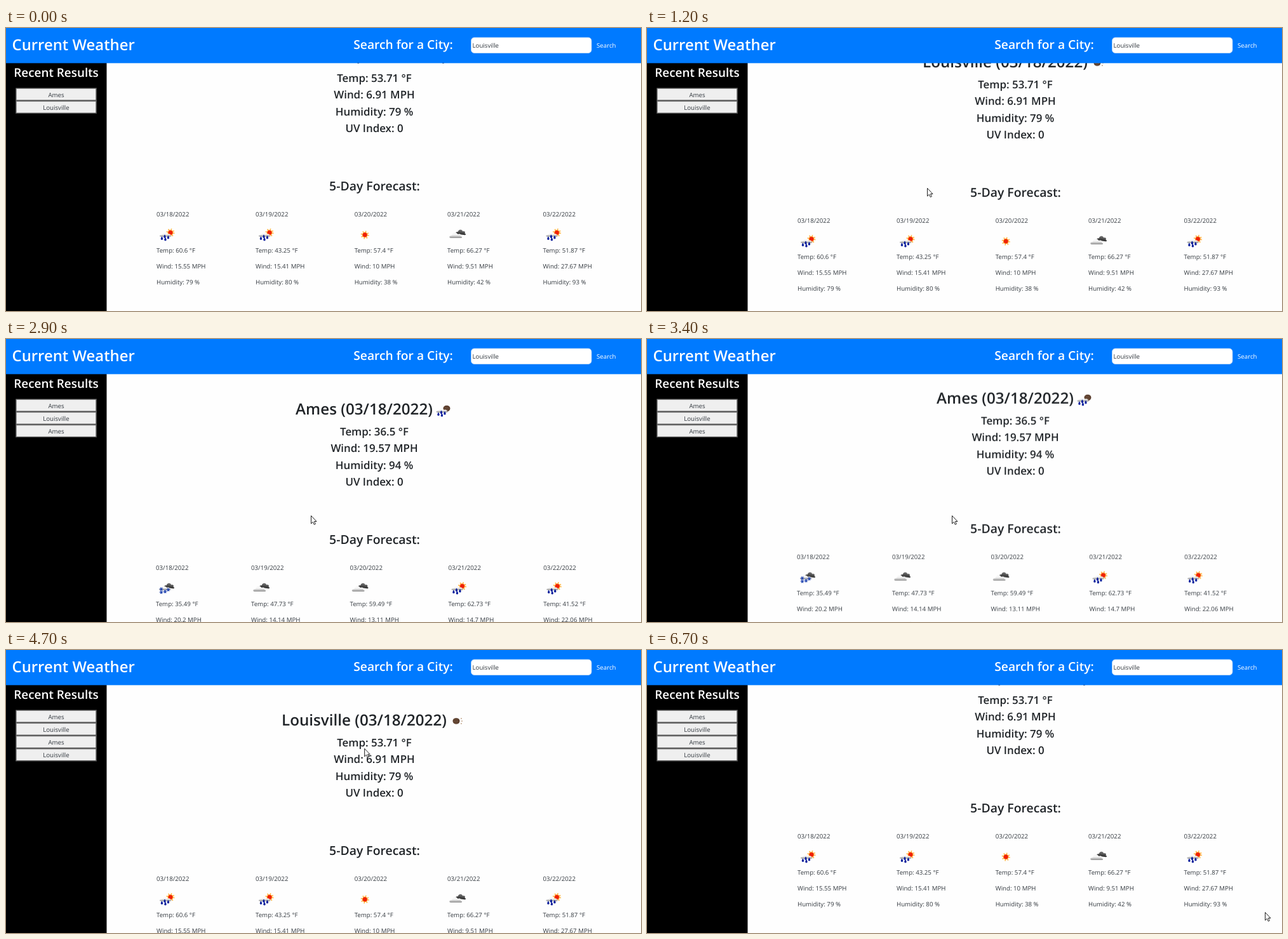
An HTML page that plays this animation: 1000x446 px, repeating every 6.8 s.

```html
<!DOCTYPE html>
<html lang="en">
<head>
<meta charset="utf-8">
<title>Current Weather</title>
<style>
  html, body { margin: 0; width: 100%; height: 100%; overflow: hidden; background: #fefefe; }
  svg { display: block; width: 1000px; height: 446px; }
  text { font-family: "Open Sans", "Noto Sans", sans-serif; text-rendering: geometricPrecision; }
  .small { font-size: 9.7px; fill: #343a40; }
  .bold { font-weight: 600; fill: #212529; }
  .white { fill: #fff; }
  .mid { text-anchor: middle; }

  /* One loop is 6.8 s, so 1% is 68 ms. */
  #page, #cursor, #arrow, #hand, #louisville, #ames, #row2, #row3 {
    animation: 6.8s linear infinite;
  }
  #page { animation-name: scroll; }
  #cursor { animation-name: move; }
  #arrow { animation-name: arrow; animation-timing-function: step-end; }
  #hand { animation-name: hand; animation-timing-function: step-end; }
  #louisville { animation-name: louisville; animation-timing-function: step-end; }
  #ames { animation-name: ames; animation-timing-function: step-end; }
  #row2 { animation-name: row2; animation-timing-function: step-end; }
  #row3 { animation-name: row3; animation-timing-function: step-end; }

  @keyframes scroll {
    0%, 16.9% { transform: translateY(-67px); }
    22%, 48.5% { transform: translateY(0); }
    54.4%, 64.54% { transform: translateY(-67px); }
    64.55%, 76.47% { transform: translateY(0); }
    79.41% { transform: translateY(-52px); }
    80.88%, 100% { transform: translateY(-67px); }
  }
  @keyframes move {
    0%, 6.6% { transform: translate(1010px, 340px); }
    13.2%, 22% { transform: translate(441px, 252px); }
    26.8%, 37.5% { transform: translate(106px, 106px); }
    42.3%, 54.4% { transform: translate(480px, 278px); }
    58%, 65.4% { transform: translate(70px, 127px); }
    72.5%, 84% { transform: translate(1010px, 180px); }
    94% { transform: translate(975px, 398px); }
    98.5%, 100% { transform: translate(973px, 413px); }
  }
  @keyframes arrow {
    0% { opacity: 1; } 26% { opacity: 0; } 38% { opacity: 1; }
    57.3% { opacity: 0; } 66% { opacity: 1; } 100% { opacity: 1; }
  }
  @keyframes hand {
    0% { opacity: 0; } 26% { opacity: 1; } 38% { opacity: 0; }
    57.3% { opacity: 1; } 66% { opacity: 0; } 100% { opacity: 0; }
  }
  @keyframes louisville { 0% { opacity: 1; } 36.6% { opacity: 0; } 64.55% { opacity: 1; } 100% { opacity: 1; } }
  @keyframes ames { 0% { opacity: 0; } 36.6% { opacity: 1; } 64.55% { opacity: 0; } 100% { opacity: 0; } }
  @keyframes row2 { 0% { opacity: 0; } 36.6% { opacity: 1; } 100% { opacity: 1; } }
  @keyframes row3 { 0% { opacity: 0; } 64.55% { opacity: 1; } 100% { opacity: 1; } }
</style>
</head>
<body>
<svg viewBox="0 0 1000 446" xmlns="http://www.w3.org/2000/svg">
  <defs>
    <linearGradient id="pale" x2="0" y2="1">
      <stop offset=".4" stop-color="#f7f7f7"/><stop offset="1" stop-color="#8c8c8c"/>
    </linearGradient>
    <linearGradient id="dark" x2="0" y2="1">
      <stop stop-color="#777"/><stop offset="1" stop-color="#2b2b2b"/>
    </linearGradient>
    <path id="puff" d="M-10 4.500C-14 4-13 0-8 0C-8-5 0-7 2-2C6-4 9-1 7 1C11 2 10 4.500 7 4.500Z"/>
    <path id="drop" d="M0-3C2 0 2.300 2.400 0 2.400S-2.300 0 0-3Z"/>
    <path id="flake" d="M-3 0H3M-1.500-2.600L1.500 2.600M1.500-2.600L-1.500 2.600" stroke="#1b3fae" stroke-width="1.100"/>

    <g id="sun">
      <circle r="5.300" fill="none" stroke="#ffb845" stroke-width="2.400" stroke-dasharray="1.600 2.563"/>
      <circle r="4.300" fill="#ff8a1c"/><circle r="3.200" fill="#ee1f0a"/>
    </g>
    <g id="moon">
      <ellipse rx="5.500" ry="4.800" fill="#573a29"/>
      <path d="M-3.500-2H3M-4 .5H4M-3 3H2" stroke="#a58468" stroke-width=".8" stroke-dasharray="1 1"/>
    </g>
    <g id="night">
      <use href="#moon" x="-1"/>
      <path d="M6-4H8M7 0H9M6 4H8" stroke="#a57a55"/>
    </g>
    <g id="cloud">
      <use href="#puff" transform="translate(6 -4) rotate(8) scale(.72 .8)" fill="url(#dark)"/>
      <use href="#puff" transform="translate(-2 1) scale(.9)" fill="url(#pale)"/>
    </g>
    <g id="rainfall">
      <use href="#puff" transform="translate(-1) scale(.85 .6)" fill="url(#pale)"/>
      <g fill="#0b1f9c">
        <use href="#drop" x="-8" y="5.500"/><use href="#drop" x="-3.500" y="2.500"/>
        <use href="#drop" x="-2.500" y="7"/><use href="#drop" x="2" y="4"/>
      </g>
    </g>
    <g id="rain"><use href="#sun" x="5.500" y="-3.500"/><use href="#rainfall"/></g>
    <g id="nightrain"><use href="#moon" x="5" y="-3.500"/><use href="#rainfall"/></g>
    <g id="snow">
      <use href="#puff" transform="translate(6 -4) rotate(8) scale(.72 .8)" fill="url(#dark)"/>
      <use href="#puff" transform="translate(-1) scale(.85 .6)" fill="url(#pale)"/>
      <use href="#flake" x="-8" y="1"/><use href="#flake" x="-8" y="6"/>
      <use href="#flake" x="-2" y="5"/><use href="#flake" x="3" y="2"/>
    </g>
  </defs>

  <rect width="1000" height="446" fill="#fefefe"/>
  <g id="page">
    <text class="bold mid" x="580.500" y="322.500" font-size="19.400">5-Day Forecast:</text>
  </g>

  <rect y="55" width="158.500" height="391" fill="#000"/>
  <text class="bold white mid" x="79" y="77" font-size="18.900">Recent Results</text>
  <g id="history"></g>

  <rect width="1000" height="55.400" fill="#007aff"/>
  <text class="bold white" x="9.500" y="35" font-size="23.900">Current Weather</text>
  <text class="bold white" x="547.200" y="33" font-size="19.300">Search for a City:</text>
  <rect x="732.500" y="15" width="189.500" height="24.500" rx="5" fill="#fff" stroke="#b5d2f5" stroke-width=".8"/>
  <text class="small" x="734.500" y="31">Louisville</text>
  <text class="small" x="930" y="31" style="fill:#fff">Search</text>

  <g id="cursor" stroke="#222" stroke-linejoin="round">
    <path id="arrow" fill="#fff" d="M.5.5V13L3.400 10.300L5.300 14.500L7.300 13.600L5.500 9.500H9Z"/>
    <path id="hand" fill="#fff" d="M-1.400 1C-1.400-.6 1-.6 1 1V6L6 7Q7.500 7.300 7.300 9L6.500 13V16H-1V14L-5 9.500C-6 8-4.200 7-3 8L-1.400 9.500Z"/>
  </g>
</svg>
<script>
  const NS = 'http://www.w3.org/2000/svg';

  function add(parent, tag, attrs, content = '') {
    const el = document.createElementNS(NS, tag);
    for (const [name, value] of Object.entries(attrs)) el.setAttribute(name, value);
    el.textContent = content;
    return parent.appendChild(el);
  }

  const icon = (parent, name, x, y) => add(parent, 'use', { href: '#' + name, x, y });

  // Each day: left edge, icon, temperature, wind, humidity.
  const cities = [
    {
      name: 'Louisville', now: [53.71, 6.91, 79], icon: ['night', 710, 112],
      days: [
        [237, 'rain', 60.6, 15.55, 79],
        [393, 'rain', 43.25, 15.41, 80],
        [548.7, 'sun', 57.4, 10, 38],
        [695, 'cloud', 66.27, 9.51, 42],
        [845.5, 'rain', 51.87, 27.67, 93]
      ]
    },
    {
      name: 'Ames', now: [36.5, 19.57, 94], icon: ['nightrain', 689, 113],
      days: [
        [236, 'snow', 35.49, 20.2, 98],
        [386, 'cloud', 47.73, 14.14, 47],
        [541.5, 'cloud', 59.49, 13.11, 45],
        [696.5, 'rain', 62.73, 14.7, 53],
        [846.3, 'rain', 41.52, 22.06, 88]
      ]
    }
  ];

  const readings = (temp, wind, humidity) =>
    [`Temp: ${temp} °F`, `Wind: ${wind} MPH`, `Humidity: ${humidity} %`];

  const page = document.getElementById('page');
  for (const city of cities) {
    const group = add(page, 'g', { id: city.name.toLowerCase() });
    add(group, 'text', { class: 'bold mid', x: 564, y: 119, 'font-size': 24.2 }, `${city.name} (03/18/2022)`);
    icon(group, ...city.icon);
    [...readings(...city.now), 'UV Index: 0'].forEach((line, i) =>
      add(group, 'text', { class: 'bold mid', x: 580, y: 152 + i * 26.25, 'font-size': 16.9 }, line));

    city.days.forEach(([x, name, ...values], day) => {
      add(group, 'text', { class: 'small', x, y: 363.6 }, `03/${18 + day}/2022`);
      icon(group, name, x + 16.5, 393);
      readings(...values).forEach((line, i) =>
        add(group, 'text', { class: 'small', x, y: 420.6 + i * 25.3 }, line));
    });
  }

  // Raised buttons: lighter top and left edges, darker bottom and right ones.
  const history = document.getElementById('history');
  ['Ames', 'Louisville', 'Ames', 'Louisville'].forEach((name, i) => {
    const row = add(history, 'g', { id: 'row' + i });
    const y = 94.5 + i * 20.2;
    add(row, 'rect', { x: 15.3, y, width: 127.4, height: 20.2, fill: '#767676' });
    add(row, 'path', { d: `M142.7 ${y}V${y + 20.2}H15.3L17 ${y + 18.8}H141.3V${y + 1.4}Z`, fill: '#4d4d4d' });
    add(row, 'rect', { x: 16.7, y: y + 1.4, width: 124.6, height: 17.4, fill: '#efefef' });
    add(row, 'text', { class: 'small mid', x: 79, y: y + 14 }, name);
  });
</script>
</body>
</html>
```
